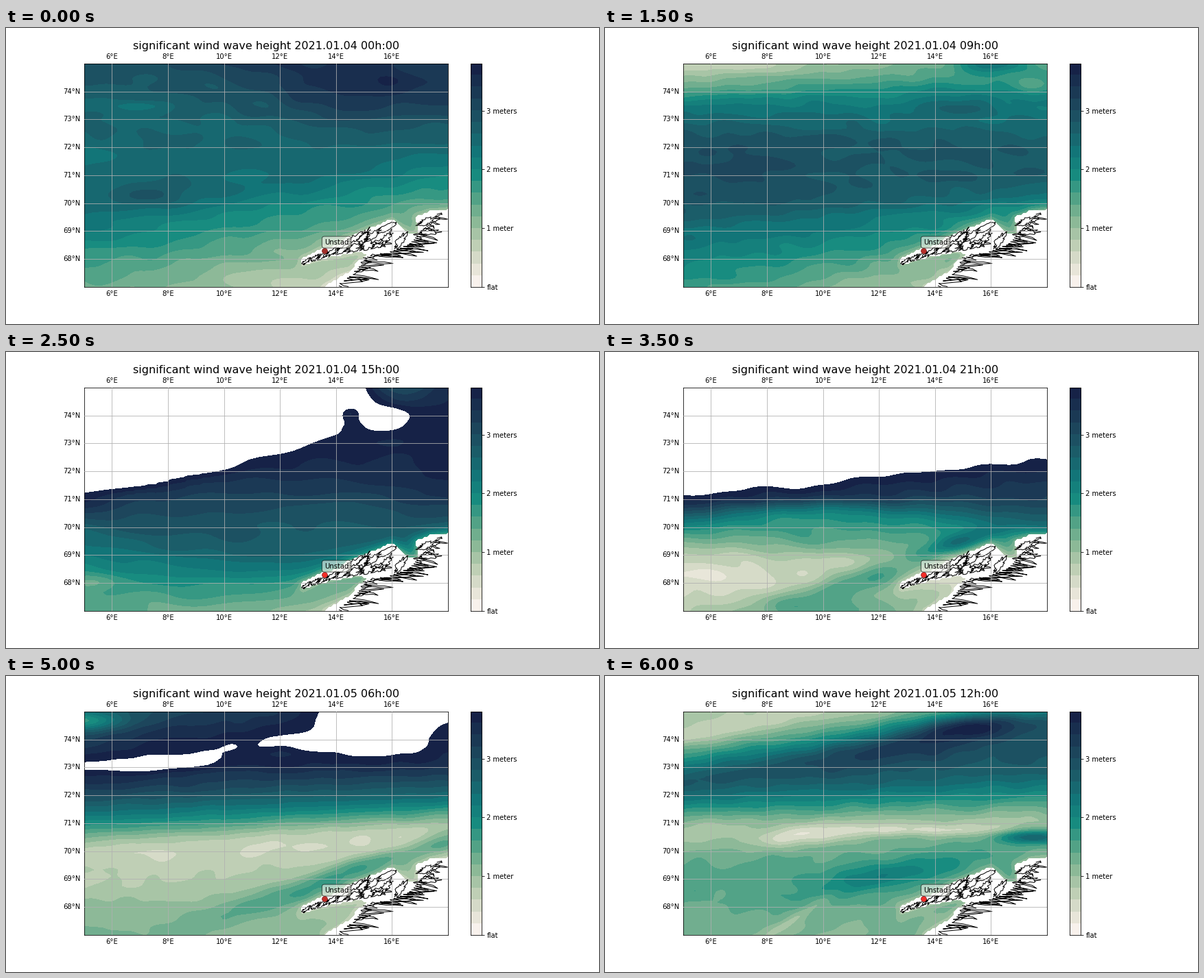
A matplotlib script that plays this animation: 864 px wide and 432 px high, repeating every 6.5 s.

```python
import numpy as np
import matplotlib.pyplot as plt
from matplotlib.animation import FuncAnimation
from matplotlib.colors import LinearSegmentedColormap
from matplotlib.path import Path

W, H = 864, 432
FRAMES, STEP_MS = 13, 500
WEST, EAST, SOUTH, NORTH = 5, 18, 67, 75
NX, NY = 157, 97
TOP = 3.8
LEVELS = np.linspace(0, TOP, 20)
plt.rcParams.update({"font.family": "DejaVu Sans", "ytick.alignment": "center"})

TEMPO = LinearSegmentedColormap.from_list("tempo", [
    "#fff6f4", "#e2e1d2", "#b9ccb0", "#88b795", "#50a286", "#188c80",
    "#127679", "#1b5f6a", "#1d495e", "#1a3351", "#151d44"])

lats = np.linspace(SOUTH, NORTH, NY)
lon, lat = np.meshgrid(np.linspace(WEST, EAST, NX), lats)

# Shore key points, from the north-east around the islands to the south
SHORE = np.array([
    (18, 69.75), (17.4, 69.7), (16.9, 69.5), (16.95, 68.9), (16.65, 68.85),
    (16.25, 69.2), (16.0, 69.4), (15.2, 69.08), (14.4, 68.75), (14.1, 68.45),
    (13.5, 68.37), (12.8, 68.0), (12.8, 67.8), (13.4, 68.02), (14.8, 68.28),
    (15.15, 68.2), (14.75, 67.85), (14.55, 67.55), (13.65, 67.05), (13.6, 66.9)])


def shore_distance():
    best = np.full(lon.shape, 99.0)
    for (x, y), (dx, dy) in zip(SHORE, np.diff(SHORE, axis=0)):
        t = np.clip(((lon - x) * dx + (lat - y) * dy) / (dx**2 + dy**2), 0, 1)
        best = np.minimum(best, np.hypot(lon - x - t * dx, lat - y - t * dy))
    return best


outline = Path(np.vstack([SHORE, [(18.1, 66.9), (18.1, 69.75)]]))
land = outline.contains_points(np.c_[lon.ravel(), lat.ravel()]).reshape(lon.shape)
shelter = 1 - 0.4 * np.exp(-shore_distance() / 0.15)


def line(height, west, east, bow=0):
    """A line of equal height: its latitudes at both edges and bow between."""
    x = np.linspace(-1, 1, NX)
    return height, (west + east) / 2 + (east - west) / 2 * x + bow * (1 - x * x)


def bump(amp, x, y, rx, ry, tilt=0):
    c, s = np.cos(np.radians(tilt)), np.sin(np.radians(tilt))
    u = ((lon - x) * c + (lat - y) * s) / rx
    v = ((lat - y) * c - (lon - x) * s) / ry
    return amp * np.exp(-(u * u + v * v))


def ripple(seed):
    rng = np.random.default_rng(seed)
    waves = [np.sin(rng.normal(0, 2) * lon + rng.normal(0, 4.5) * lat
                    + rng.uniform(0, 2 * np.pi)) for _ in range(26)]
    return 0.013 * np.sum(waves, axis=0)


def smooth(column):
    kernel = np.exp(-(np.arange(-6, 7) / 2.5) ** 2)
    return np.convolve(np.pad(column, 6, mode="edge"), kernel / kernel.sum(), "valid")


states = []


def sea(step, glow, lines, bumps):
    """Add a sea state: lines from south to north, bumps, marker brightness."""
    heights, tracks = zip(*[line(*l) for l in lines])
    z = np.array([smooth(np.interp(lats, col, heights)) for col in np.transpose(tracks)]).T
    z += ripple(step + 5) + sum(bump(*b) for b in bumps)
    states.append((step, glow, np.maximum(z * shelter, 0.03)))


sea(0, 0.63,
    [(0.6, 65.5, 67.6), (1.2, 66.7, 69.4), (2, 68.7, 71), (2.45, 69.6, 71.8),
     (2.6, 73.6, 72.2), (2.9, 75, 73), (3.3, 76, 74.1)],
    [(0.4, 14.5, 73.8, 3, 1.3), (-0.35, 7, 73.5, 1, 0.2), (0.35, 7.2, 70.35, 1.5, 0.4),
     (-0.3, 10.9, 71, 0.7, 0.2), (-0.25, 5.3, 71.7, 0.9, 0.4)])

sea(3, 0.71,
    [(1.1, 65.6, 68.6), (1.8, 67.2, 69.7), (2.4, 69, 70.4), (2.8, 69.8, 71),
     (2.8, 72.6, 71.8), (2.4, 73.3, 73), (1.7, 73.85, 74.6), (0.5, 74.9, 76.2)],
    [(0.3, 7, 71.3, 2.4, 1), (1, 16, 75, 1.3, 0.35), (0.4, 14.8, 73.5, 1.5, 0.4),
     (-0.3, 17.4, 74.2, 0.8, 0.3)])

sea(5, 0.95,
    [(0.9, 65.2, 68), (1.7, 68, 69.25, -0.7), (2.2, 69, 69.7, -0.9),
     (2.65, 70, 70.05, -0.9), (3.1, 70.4, 70.6, 0.6), (3.5, 70.85, 71.2, 0.9),
     (3.8, 71.15, 75.6, -0.95), (6, 73.5, 79)],
    [(0.5, 15.8, 73.95, 0.65, 0.4), (-0.5, 14.5, 74.1, 0.35, 0.25),
     (-1.2, 16.2, 75.2, 1.4, 0.7), (-0.3, 5.2, 68, 0.9, 0.3)])

sea(7, 0.95,
    [(0.8, 66.9, 68), (0.5, 67.8, 68.2), (0.7, 69, 68.6), (1.2, 69.5, 69),
     (2, 70, 69.5, 0.75), (2.8, 70.5, 70.3, 0.5), (3.3, 70.75, 71.3),
     (3.8, 71.05, 72.45), (6, 73.5, 75)],
    [(1, 11.5, 68.1, 2.8, 0.5, 14), (-0.3, 5.5, 68.3, 1.2, 0.3),
     (0.9, 14.8, 69.45, 1.5, 0.3, 16), (0.6, 10.5, 67, 3, 0.6)])

sea(9, 0.63,
    [(1.1, 67, 66.5), (0.6, 68, 67.5), (0.15, 68.6, 69.6), (0.15, 69.3, 70.2),
     (0.8, 70, 70.9), (1.5, 70.4, 71.35), (2.4, 71, 71.65), (3.2, 71.5, 72),
     (3.8, 72.1, 72.55), (5, 74, 74)],
    [(1.5, 13.5, 68.75, 4.2, 0.45, 16), (0.9, 17.9, 70.25, 1, 0.25, 16),
     (-2.6, 4.9, 74.65, 1.5, 0.35), (-0.45, 10, 72.85, 1.6, 0.4)])

sea(11, 0.88,
    [(1.3, 66.8, 68), (1.55, 68, 69.2), (1.4, 69.3, 69.8), (0.55, 69.85, 70.5),
     (0.6, 70.4, 70.9), (1.2, 70.8, 71.2), (2, 71.7, 72.3), (2.7, 72.4, 73.1),
     (3.3, 73, 73.9), (1.9, 73.75, 75.6), (0.6, 75, 77)],
    [(0.65, 7.3, 73.05, 2.2, 0.18), (-0.6, 12.3, 73.5, 1.5, 0.2),
     (1.9, 15.8, 75.1, 2.4, 0.7), (-1, 18, 74.1, 1, 0.6),
     (0.9, 15.2, 69.6, 1.8, 0.3, 16), (0.9, 17.8, 70.5, 1.2, 0.35, 12)])

sea(12, 0.95,
    [(1.2, 66.8, 68), (1.6, 69, 69.3), (1.3, 69.9, 70.6), (0.9, 70.6, 71),
     (1, 71, 71.2), (1.9, 71.6, 72), (2.6, 72.2, 72.8), (2.9, 72.5, 73.7),
     (2.6, 72.8, 74.6), (1.6, 73.5, 75.3), (0.6, 74, 76.5), (1, 75, 78)],
    [(0.7, 13, 73.8, 3.5, 0.5, 8), (1.2, 15.2, 74.5, 2, 0.4, 4),
     (-0.6, 9.5, 70.55, 2.2, 0.35, 6), (-0.5, 13.8, 70.75, 2.5, 0.2),
     (1.3, 17.5, 70.5, 1.1, 0.22), (0.6, 12.5, 69.2, 3, 0.5, 12),
     (-0.4, 9, 67.6, 1.6, 0.2, 32)])


def state_at(step):
    for (t0, g0, z0), (t1, g1, z1) in zip(states, states[1:]):
        if step <= t1:
            f = (step - t0) / (t1 - t0)
            return g0 + (g1 - g0) * f, np.ma.array(z0 + (z1 - z0) * f, mask=land)


fig = plt.figure(figsize=(W / 72, H / 72), dpi=72, facecolor="white")
ax = fig.add_axes([113.68 / W, 0.125, 530.01 / W, 0.755])
bar = fig.add_axes([677.16 / W, 0.125, 16.31 / W, 0.755])
ax.set(xlim=(WEST, EAST), ylim=(SOUTH, NORTH))
meridians, parallels = range(6, 18, 2), range(68, 75)
ax.set_xticks(meridians, [f"{x}°E" for x in meridians])
ax.set_yticks(parallels, [f"{y}°N" for y in parallels])
ax.tick_params(length=0, pad=5, labelsize=10, labeltop=True)
ax.set_axisbelow(False)
ax.grid(color="#b0b0b0", lw=0.8, zorder=2.6)

rng = np.random.default_rng(12)


def coast(points):
    ax.plot(*np.transpose(points), color="black", lw=1, zorder=2.3)


def island(x, y, rx, ry, tilt, rough=0.65, n=30):
    a = np.linspace(0, 2 * np.pi, n, endpoint=False)
    r = 1 - rough * rng.random(n)
    u, v = rx * r * np.cos(a), ry * r * np.sin(a)
    c, s = np.cos(np.radians(tilt)), np.sin(np.radians(tilt))
    ring = np.c_[x + u * c - v * s, y + u * s + v * c]
    coast(np.vstack([ring, ring[:1]]))


def along(points, n):
    """n evenly spaced places on a path through the points."""
    x, y = np.transpose(points)
    t = np.linspace(0, len(points) - 1, n)
    return zip(np.interp(t, range(len(points)), x), np.interp(t, range(len(points)), y))


# The island chain grows wider towards the north-east
for i, (x, y) in enumerate(along([(12.95, 67.92), (14.0, 68.3), (15.6, 68.55)], 8)):
    island(x, y, 0.24 + 0.04 * i, 0.08 + 0.015 * i, 35 - 3 * i)
for x, y in along([(14.7, 68.75), (15.3, 68.85), (16.3, 68.65)], 5):
    island(x, y, 0.45, 0.15, rng.uniform(15, 60))
island(15.8, 69.12, 0.42, 0.12, 28, 0.25)
island(17.3, 69.35, 0.5, 0.15, 15)
island(17.3, 68.95, 0.55, 0.12, 5)

# The mainland shore is cut by narrow inlets running east
mainland = []
for x, y in along([(14.1, 67.05), (14.75, 67.55), (15.0, 68.0), (15.9, 68.2),
                   (16.6, 68.5), (17.0, 68.9), (17.6, 69.55)], 36):
    reach = rng.uniform(0.15, 1.1) * min(1, (18.3 - x) / 1.8)
    lean = rng.uniform(-0.14, 0.12)
    out = np.array([0, 0.35, 0.7, 1, 0.75, 0.45, 0.1])
    gap = np.array([0, 0, 0, 0, 0.04, 0.06, 0.07])
    wobble = rng.uniform(-0.03, 0.03, out.size)
    mainland += zip(x + reach * out + wobble, y + lean * out + gap + wobble[::-1])
coast(mainland)

spot, = ax.plot(13.585, 68.3, "o", ms=8, mec="#6e2020", mew=0.6, zorder=4)
ax.text(13.59, 68.53, "Unstad", size=10, va="baseline", zorder=5,
        bbox=dict(boxstyle="round,pad=0.35", facecolor="#f4f6ee", alpha=0.6))
title = fig.text(378.7 / W, (H - 31) / H, "", size=16, ha="center", va="baseline")

bar.imshow(np.arange(0.1, TOP, 0.2)[:, None], cmap=TEMPO, vmin=0, vmax=TOP,
           origin="lower", extent=(0, 1, 0, TOP), aspect="auto",
           interpolation="nearest")
bar.set_xticks([])
bar.yaxis.tick_right()
bar.set_yticks(range(4), ["flat", "1 meter", "2 meters", "3 meters"], size=10,
               va="center_baseline")

layer = None


def update(step):
    global layer
    if layer is not None:
        layer.remove()
    glow, z = state_at(step)
    layer = ax.contourf(lon, lat, z, LEVELS, cmap=TEMPO, vmin=0, vmax=TOP, zorder=1)
    days, hour = divmod(3 * step, 24)
    title.set_text(f"significant wind wave height 2021.01.{4 + days:02d} {hour:02d}h:00")
    spot.set_markerfacecolor((glow, 0.18, 0.16))
    return layer, title, spot


anim = FuncAnimation(fig, update, frames=FRAMES, interval=STEP_MS,
                     repeat=True, repeat_delay=0, blit=False)
plt.show()
```
